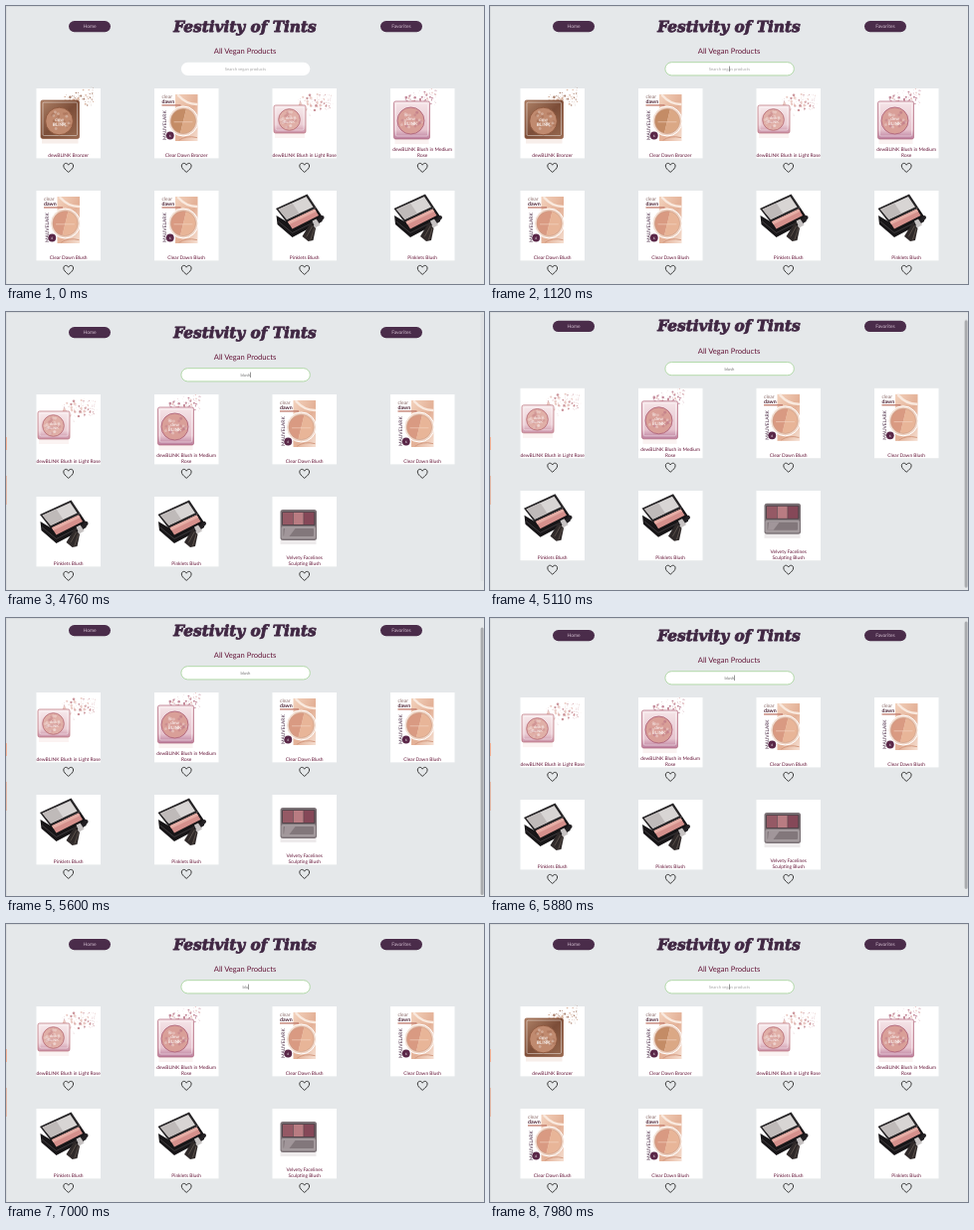
An HTML page for the animation above (8 s loop, 480x280 px).

```html
<!DOCTYPE html>
<html lang="en">
<head>
<meta charset="utf-8">
<title>Vegan products</title>
<style>
html, body { margin: 0; width: 100%; height: 100%; overflow: hidden; background: #e5e8ea; }
svg { display: block; width: 480px; height: 280px; }
text { font-family: Lato, "Open Sans", sans-serif; text-rendering: geometricPrecision; }
.mid { text-anchor: middle; }
.title { font: italic bold 15.3px "DejaVu Serif", "Noto Serif", serif; fill: #402743; stroke: #402743; stroke-width: .85; stroke-linejoin: round; }
.head { font-size: 7.6px; fill: #641538; }
.label { font-size: 4.85px; fill: #641538; }
.nav { font-size: 4.9px; fill: #d3bfd0; }
.field { font-size: 4.2px; }

#page { animation: scroll 8s infinite; }
#thumb { animation: scroll-thumb 8s infinite; }
#caret { animation: blink 8s step-end infinite; }
#ring { animation: focus 8s step-end infinite; }
#edge { animation: edge 8s step-end infinite; }

@keyframes scroll {
  0%, 59.4% { transform: translateY(0); animation-timing-function: cubic-bezier(.3, 0, .3, 1); }
  68%, 70% { transform: translateY(-8px); animation-timing-function: cubic-bezier(.4, 0, .4, 1); }
  77.5% { transform: translateY(.6px); }
  80%, 100% { transform: translateY(0); }
}
@keyframes scroll-thumb {
  0%, 59.4% { transform: translateY(0); opacity: 0; }
  60.4% { opacity: 1; }
  68%, 70% { transform: translateY(8px); opacity: 1; }
  77.5% { transform: translateY(0); }
  80.5% { opacity: 1; }
  82.3%, 100% { transform: translateY(0); opacity: 0; }
}
@keyframes blink {
  0% { opacity: 0; }
  12.25% { opacity: 1; }
  19.8% { opacity: 0; }
  26.25% { opacity: 1; }
  47% { opacity: 0; }
  52.6% { opacity: 1; }
  60.3% { opacity: 0; }
  73.5% { opacity: 1; }
  81% { opacity: 0; }
  84%, 100% { opacity: 1; }
}
@keyframes focus { 0% { stroke-opacity: 0; } 12.25%, 100% { stroke-opacity: 1; } }
@keyframes edge { 0% { opacity: 0; } 52.5%, 100% { opacity: 1; } }
</style>
</head>
<body>
<svg viewBox="0 0 480 280">
  <defs>
    <linearGradient id="skin" x1="0" y1="0" x2="1" y2="1">
      <stop offset="0" stop-color="#f3d2bd"/><stop offset=".55" stop-color="#e3b096"/><stop offset="1" stop-color="#f6e0d3"/>
    </linearGradient>
    <linearGradient id="bronze" x1="0" y1="0" x2="1" y2="1">
      <stop offset="0" stop-color="#b08368"/><stop offset=".5" stop-color="#7c4d38"/><stop offset="1" stop-color="#986a50"/>
    </linearGradient>
    <linearGradient id="rose" x1="0" y1="0" x2="0" y2="1">
      <stop offset="0" stop-color="#f7eaec"/><stop offset=".7" stop-color="#ebced5"/><stop offset="1" stop-color="#c98fa5"/>
    </linearGradient>
    <linearGradient id="mauve" x1="0" y1="0" x2="0" y2="1">
      <stop offset="0" stop-color="#f5e5e8"/><stop offset=".75" stop-color="#e6c3ce"/><stop offset="1" stop-color="#b97b9b"/>
    </linearGradient>
  </defs>
  <rect width="480" height="280" fill="#e5e8ea"/>
  <g id="page">
    <rect x="63" y="15" width="42" height="11.2" rx="5.6" fill="#4a2c4a"/>
    <rect x="376" y="15" width="42" height="11.2" rx="5.6" fill="#4a2c4a"/>
    <text class="nav mid" x="84" y="22.4">Home</text>
    <text class="nav mid" x="397" y="22.4">Favorites</text>
    <text class="title mid" x="240" y="25.6">Festivity of Tints</text>
    <text class="head mid" x="240" y="48.4">All Vegan Products</text>
    <rect id="ring" x="175.9" y="56.7" width="129.4" height="13.2" rx="6.6" fill="#fff" stroke="#a3d296" stroke-width=".8"/>
    <text id="field" class="field mid" x="240.4" y="64.9"></text>
    <rect id="caret" y="60.6" width=".6" height="5.4" fill="#555"/>
    <g id="cards"></g>
  </g>
  <rect id="thumb" x="476.6" y="1.5" width="3" height="269.5" rx="1.5" fill="#a8aaad"/>
  <rect width="480" height=".5" fill="#cdd0d3"/>
  <rect width=".5" height="280" fill="#cdd0d3"/>
  <g id="edge">
    <rect y="126" width="1" height="13" fill="#f3b195"/>
    <rect y="165" width="1" height="29" fill="#e3b8a6"/>
  </g>
</svg>
<script>
const LOOP = 8000;
const $ = id => document.getElementById(id);

function random(seed) {
  return () => (seed = seed * 16807 % 2147483647) / 2147483647;
}

const rect = (x, y, w, h, fill, more = '') =>
  `<rect x="${x}" y="${y}" width="${w}" height="${h}" fill="${fill}" ${more}/>`;
const circle = (x, y, r, fill, more = '') =>
  `<circle cx="${x}" cy="${y}" r="${r}" fill="${fill}" ${more}/>`;
const poly = (points, fill) => `<polygon points="${points}" fill="${fill}"/>`;
const path = (d, stroke, width) =>
  `<path d="${d}" fill="none" stroke="${stroke}" stroke-width="${width}" stroke-linecap="round"/>`;
const text = (x, y, size, fill, str, more = '') =>
  `<text x="${x}" y="${y}" font-size="${size}" fill="${fill}" ${more}>${str}</text>`;

// Powder crumbs along a rising diagonal, finer towards the end.
function splash(x, y, w, h, colors, seed) {
  const rnd = random(seed);
  rnd();
  let out = '';
  for (let i = 0; i < 130; i++) {
    const u = rnd(), v = (rnd() + rnd()) / 2;
    const py = y + h * (.6 - u * .35 + (v - .5) * .9);
    out += circle((x + w * u).toFixed(1), py.toFixed(1), (.25 + rnd() ** 3 * (1.5 - u)).toFixed(2),
      colors[i % colors.length], 'opacity=".75"');
  }
  return out;
}

function compact({ box: [x, y, w, h], pan: [cx, cy, r], burst, frame, powder, dust, seed }) {
  const rnd = random(seed + 5);
  let out = splash(...burst, dust, seed) +
    rect(x + 1, y + h, w - 2, 5, dust[1], 'opacity=".18"') +
    rect(x, y, w, h, `url(#${frame})`, `rx="1.8" stroke="${dust[0]}" stroke-width=".7"`) +
    rect(x + 2, y + 2, w - 4, h - 5, 'none', 'rx="1.2" stroke="#fff" stroke-opacity=".55" stroke-width=".8"') +
    circle(cx, cy, r, powder, `stroke="${dust[0]}" stroke-width=".9"`);
  for (let i = 0; i < 24; i++) {
    const a = rnd() * 6.28, d = Math.sqrt(rnd()) * r * .85;
    out += circle((cx + d * Math.cos(a)).toFixed(1), (cy + d * Math.sin(a)).toFixed(1), 1.4,
      i % 2 ? '#fff' : dust[0], 'opacity=".28"');
  }
  const label = 'class="mid" font-weight="700" fill-opacity=".75"';
  return out + text(cx, cy - .2, r * .34, '#fff', 'dew', label) + text(cx, cy + r * .33, r * .34, '#fff', 'BLINK', label);
}

function duo(left, right) {
  const cx = 29, cy = 33;
  const half = (sweep, fill) =>
    `<path d="M${cx + 3} ${cy - 12.2}A12.56 12.56 0 0 ${sweep} ${cx - 3} ${cy + 12.2}Z" fill="${fill}"/>`;
  return rect(21, 6, 22.5, 47, 'url(#skin)') +
    path('M24 7Q32 16 42.5 16', '#f9e9de', 2.5) +
    path('M25 52Q32 47 42.5 49.5', '#d39a80', 1) +
    text(7.5, 10, 5, '#8b6a68', 'clear') +
    text(7.5, 15, 5.2, '#4d2436', 'dawn', 'font-weight="700"') +
    rect(7.5, 16.3, 19, 1.3, '#c07a6c') +
    text(0, 0, 4.9, '#4b2b46', 'MAUVELARK', 'transform="translate(12.2 52) rotate(-90)"') +
    circle(cx, cy, 15, '#f1d9cb', 'fill-opacity=".85" stroke="#fff" stroke-width="1"') +
    half(0, left) + half(1, right) +
    path(`M${cx - 9} ${cy + .8}H${cx + 9}`, '#f3d9c8', .6) +
    circle(cx, cy, 12.6, 'none', 'stroke="#c59780" stroke-width=".5"') +
    circle(15.8, 47.5, 3.9, '#5a2748') +
    text(15.8, 48.8, 3.4, '#fff', '6', 'class="mid"');
}

// An open case with a clear lid and a short brush lying in front.
function kit() {
  return poly('3.5,18 35,3.5 44,17 14,31.5', '#262426') +
    poly('6,18.8 34,6 41,16.5 14.5,29', '#d8d5d4') +
    poly('6,18.8 20,12.4 27,23 14.5,29', '#bfbab9') +
    poly('4,25 14,31 44,17 50,26 50,31 20,47 5,34', '#171517') +
    poly('15.5,31.2 42.5,18.6 46.5,25 20,38.5', '#d5908c') +
    poly('15.5,31.2 42.5,18.6 44,21 17,34', '#e6aea6') +
    path('M6 31L20 42.5L49 28', '#5a5558', .6) +
    path('M50 27L45 32', '#232023', 4) +
    poly('40,30.5 44,28.5 48,34.5 43,37.5', '#c6c2c2') +
    poly('38.5,32 43.5,38 41,50 36,51 30,46', '#2f2929') +
    path('M40 36L34.5 46M42 38L38.5 49', '#75695f', .6);
}

function palette() {
  return rect(8, 44, 36, 4, '#a3989b', 'opacity=".2"') +
    rect(8, 13, 36.5, 31, '#7b7276', 'rx="2.5"') +
    rect(9.5, 15, 33.5, 14, '#54454b', 'rx="1"') +
    rect(10.5, 16, 10, 12, '#955965') + rect(21.1, 16, 10, 12, '#b97c82') + rect(31.7, 16, 10, 12, '#854858') +
    rect(9, 30, 34.5, 12.5, '#a39a9d', 'rx="1.5"') +
    rect(11, 32, 30.5, 8, '#82777b', 'rx="1"') +
    poly('12.5,32 23,32 17,40 11.5,40', '#a1969a');
}

const bronzer = compact({ box: [4.5, 12, 38.5, 38.5], pan: [23, 33, 13.8], burst: [24, 1, 34, 24],
  frame: 'bronze', powder: '#c08a6f', dust: ['#8e573e', '#d0a38a'], seed: 1187 });
const lightRose = compact({ box: [1.5, 17, 32, 28], pan: [17, 31.5, 10.8], burst: [25, 5, 36, 24],
  frame: 'rose', powder: '#e0afa7', dust: ['#b9707a', '#e6bdb6'], seed: 2903 });
const mediumRose = compact({ box: [3.5, 13, 36, 38], pan: [20.5, 32.5, 13.5], burst: [13, 2, 34, 22],
  frame: 'mauve', powder: '#d99f98', dust: ['#b0667c', '#e3b4b1'], seed: 4721 });
const blushDuo = duo('#d99a82', '#e8b598');

const products = [
  [['dewBLINK Bronzer'], bronzer],
  [['Clear Dawn Bronzer'], duo('#c48c66', '#dba885')],
  [['dewBLINK Blush in Light Rose'], lightRose],
  [['dewBLINK Blush in Medium', 'Rose'], mediumRose],
  [['Clear Dawn Blush'], blushDuo],
  [['Clear Dawn Blush'], blushDuo],
  [['Pinklets Blush'], kit()],
  [['Pinklets Blush'], kit()],
  [['Velvety Facelines', 'Sculpting Blush'], palette()]
].map(([lines, art]) => ({ name: lines.join(' ').toLowerCase(), lines, art }));

const heart = '<path transform="translate(0 .4)" d="M32.2 84C29 81.4 27.3 79.7 27.3 77.6C27.3 74.6 31 74 32.2 76.8C33.4 74 37.1 74.6 37.1 77.6C37.1 79.7 35.4 81.4 32.2 84Z" fill="none" stroke="#333" stroke-width=".95" stroke-linejoin="round"/>';

$('cards').innerHTML = products.map(({ lines, art }) => {
  const label = lines.map((line, i) =>
    `<text class="label mid" x="32.2" y="${69 - 5.7 * (lines.length - 1 - i)}">${line}</text>`).join('');
  return `<g>${rect(0, 0, 64.5, 70.4, '#fff')}${art}${label}${heart}</g>`;
}).join('');
const cards = [...$('cards').children];

const typing = [
  [0, ''], [2450, 'b'], [2660, 'bl'], [3080, 'blu'], [3220, 'blus'], [3290, 'blush'],
  [6720, 'blus'], [6930, 'blu'], [7210, 'bl'], [7350, 'b'], [7490, '']
];

let shown = null;
function show(query) {
  if (query === shown) return;
  shown = query;
  const field = $('field');
  field.textContent = query || 'Search vegan products';
  field.setAttribute('fill', query ? '#777' : '#aaa');
  $('caret').setAttribute('x', 240.2 + (query ? field.getComputedTextLength() / 2 + .2 : 0));
  let slot = 0;
  products.forEach(({ name }, i) => {
    const hit = name.includes(query);
    cards[i].setAttribute('display', hit ? 'inline' : 'none');
    if (!hit) return;
    cards[i].setAttribute('transform', `translate(${30.5 + slot % 4 * 118.5} ${83 + Math.floor(slot / 4) * 103})`);
    slot++;
  });
}

let start;
function tick(now) {
  start ??= now;
  const t = (now - start) % LOOP;
  show(typing.findLast(([at]) => at <= t)[1]);
  requestAnimationFrame(tick);
}
show('');
requestAnimationFrame(tick);
</script>
</body>
</html>
```
